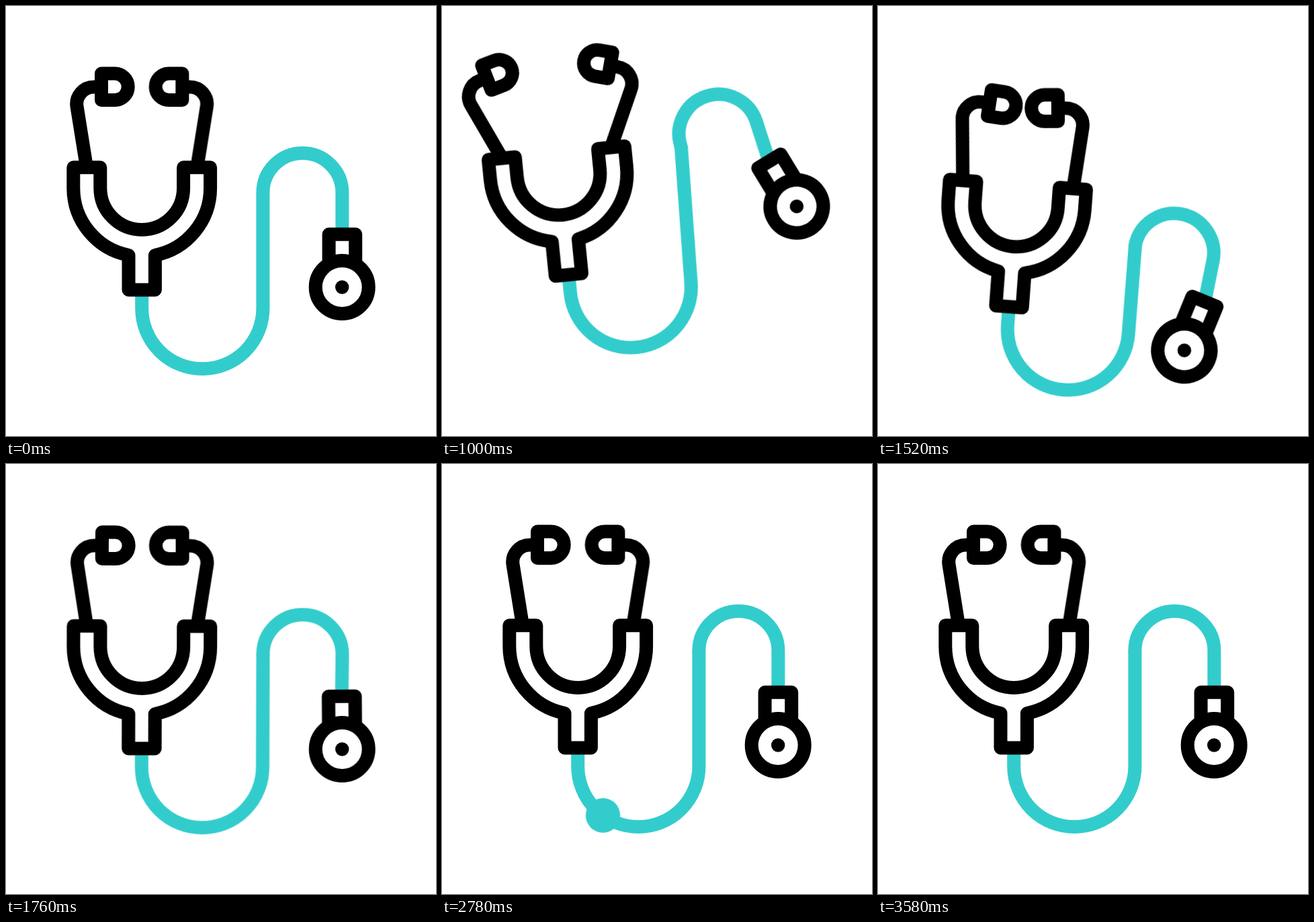
These frames come from a looping animation (640 by 640 pixels, 3.6 s). An HTML page without scripts:

```html
<!DOCTYPE html>
<html lang="en">
<head>
<meta charset="utf-8">
<title>Stethoscope</title>
<style>
  html, body { margin: 0; width: 100%; height: 100%; overflow: hidden; background: #fff; }
  svg { display: block; width: 100%; height: 100%; }

  .ink, .tube { stroke-width: 20; stroke-linejoin: round; }
  .ink { fill: #fff; stroke: #000; }
  .tube { fill: none; stroke: #3cc; }
  .open { fill: none; }

  .body, .ear, .bend, .chest, .hose, .pulse { animation: 3.6s cubic-bezier(.33, 0, .67, 1) infinite; }
  .body { transform-origin: 320px 320px; animation-name: body; }
  .ear { transform-origin: 120px 238px; animation-name: ear; }
  .bend { transform-origin: 441.4px 278px; animation-name: bend; }
  .chest { transform-origin: 500.4px 338px; animation-name: chest; }
  .hose { animation-name: hose; }
  .pulse {
    fill: #3cc;
    offset-path: path("M500.4 395V278A59 59 0 0 0 382.4 278V450A90.1 90.1 0 0 1 202.2 450V395");
    offset-rotate: 0deg;
    animation-name: pulse;
  }

  /* Jump, drop below rest, settle */
  @keyframes body {
    0%, 50%, 100% { transform: translate(0, 0) rotate(0deg); }
    13.2% { transform: translate(0, 0) rotate(0deg); animation-timing-function: cubic-bezier(.3, 0, .35, 1); }
    21.667% { transform: translate(-26px, -38px) rotate(-6.3deg); animation-timing-function: cubic-bezier(.7, 0, .75, .6); }
    40.278% { transform: translate(0, 38px) rotate(4.7deg); }
  }
  @keyframes ear {
    0%, 50%, 80.556%, 99.2%, 100% { transform: rotate(0deg); }
    13.2% { transform: rotate(0deg); animation-timing-function: cubic-bezier(.3, 0, .35, 1); }
    21.667% { transform: rotate(-17deg); animation-timing-function: cubic-bezier(.7, 0, .68, .7); }
    40.278% { transform: rotate(5deg); }
    88.056% { transform: rotate(-14deg); }
  }
  @keyframes bend {
    0%, 50.556%, 100% { transform: translate(0, 0) rotate(0deg); }
    13.2% { transform: translate(0, 0) rotate(0deg); animation-timing-function: cubic-bezier(.3, 0, .35, 1); }
    21.667% { transform: translate(4px, -49px) rotate(-13.7deg); animation-timing-function: cubic-bezier(.7, 0, .68, .7); }
    40.278% { transform: translate(0, 52px) rotate(8deg); }
  }
  /* Upper end follows the left end of the bend */
  @keyframes hose {
    0%, 50.556%, 100% { d: path("M202.2 422L202.2 450A90.1 90.1 0 0 0 382.4 450L382.4 278"); }
    13.2% {
      d: path("M202.2 422L202.2 450A90.1 90.1 0 0 0 382.4 450L382.4 278");
      animation-timing-function: cubic-bezier(.3, 0, .35, 1);
    }
    21.667% {
      d: path("M202.2 422L202.2 450A90.1 90.1 0 0 0 382.4 450L388.1 243");
      animation-timing-function: cubic-bezier(.7, 0, .68, .7);
    }
    40.278% { d: path("M202.2 422L202.2 450A90.1 90.1 0 0 0 382.4 450L383 321.8"); }
  }
  /* Damped swing */
  @keyframes chest {
    0%, 72.222%, 100% { transform: rotate(0deg); }
    13.2% { transform: rotate(0deg); animation-timing-function: cubic-bezier(.3, 0, .35, 1); }
    21.667% { transform: rotate(-15deg); animation-timing-function: cubic-bezier(.7, 0, .75, .6); }
    40.278% { transform: rotate(12deg); }
    53.611% { transform: rotate(-6.5deg); }
    61.111% { transform: rotate(4deg); }
    67.222% { transform: rotate(-2.7deg); }
  }
  @keyframes pulse {
    0%, 55.55% { opacity: 0; offset-distance: 0%; }
    55.56% { opacity: 1; offset-distance: 0%; }
    85% { opacity: 1; offset-distance: 100%; }
    85.01%, 100% { opacity: 0; offset-distance: 100%; }
  }
</style>
</head>
<body>
<svg viewBox="0 0 640 640">
  <defs>
    <g id="earpiece" class="ink">
      <path class="open" d="M142 120.4H131C115 120.4 103 134.5 105.6 150L120 240"/>
      <path d="M142 100.6H162a19.7 19.7 0 0 1 0 39.4H142Z"/>
    </g>
  </defs>
  <g class="body">
    <path class="tube hose" d="M202.2 422L202.2 450A90.1 90.1 0 0 0 382.4 450L382.4 278"/>
    <g class="bend">
      <path class="tube" stroke-linecap="round" d="M382.4 278A59 59 0 0 1 500.4 278V338"/>
    </g>
    <circle class="pulse" r="25.7"/>
    <g class="ear"><use href="#earpiece"/></g>
    <g transform="matrix(-1 0 0 1 404.4 0)">
      <g class="ear"><use href="#earpiece"/></g>
    </g>
    <path class="ink" d="M182.5 371A102 102 0 0 1 100.3 271V240.3H140.3V271A61.9 61.9 0 0 0 264.1 271V240.3H304.1V271A102 102 0 0 1 221.9 371V422.5H182.5Z"/>
    <g class="bend">
      <g class="chest">
        <path class="ink" d="M480.6 385V339.8H520.2V385"/>
        <circle class="ink" cx="500.2" cy="418.5" r="39.5"/>
        <circle cx="500.2" cy="418.5" r="10.2"/>
      </g>
    </g>
  </g>
</svg>
</body>
</html>
```
